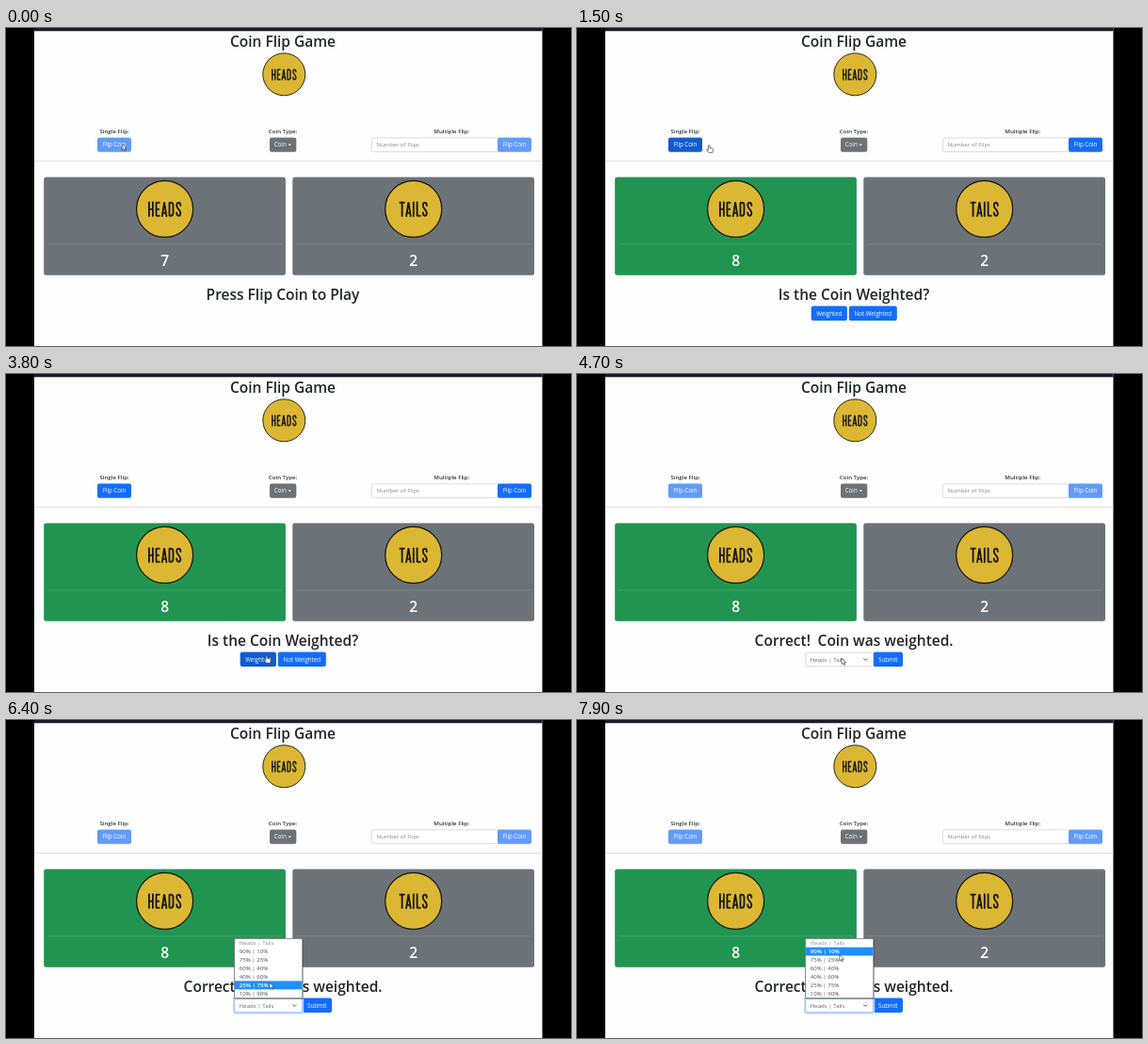
An HTML page that plays this animation: 600x338 px, repeating every 8 s.

```html
<!DOCTYPE html>
<html lang="en">
<head>
<meta charset="utf-8">
<title>Coin Flip Game</title>
<style>
  html, body { margin: 0; width: 100%; height: 100%; overflow: hidden; background: #000; }
  svg { display: block; width: 600px; height: 338px; }
  text { font-family: "Open Sans", "Noto Sans", sans-serif; font-size: 6.1px; fill: #63676b; }
  .mid { text-anchor: middle; }
  .h { font-size: 15.5px; font-weight: 600; fill: #212529; }
  .label { font-weight: 600; fill: #303439; }
  .btn text { font-size: 6.2px; font-weight: 500; fill: #fff; text-anchor: middle; }
  .count { font-size: 15.5px; font-weight: 600; fill: #fff; }
</style>
</head>
<body>
<svg id="stage" viewBox="0 0 600 338"></svg>
<script>
const NS = 'http://www.w3.org/2000/svg';
const stage = document.getElementById('stage');
const LOOP = 8000, STEP = 100;
const BLUE = '#126dfb', PALE = '#629bf9', DARK = '#105bd0', GREY = '#6b7278', GREEN = '#219452';

function add(parent, tag, attrs = {}, content) {
  const node = document.createElementNS(NS, tag);
  for (const key in attrs) node.setAttribute(key, attrs[key]);
  if (content !== undefined) node.textContent = content;
  parent.appendChild(node);
  return node;
}
const group = (parent = stage, attrs) => add(parent, 'g', attrs);
const rect = (parent, x, y, width, height, fill, more) =>
  add(parent, 'rect', { x, y, width, height, fill, ...more });
const label = (parent, x, y, content, cls = '') =>
  add(parent, 'text', { x, y, class: cls }, content);
const line = (x1, x2, y, stroke, parent = stage) =>
  add(parent, 'path', { d: `M${x1} ${y}H${x2}`, stroke, 'stroke-width': 0.8 });
const show = (node, on) => node.setAttribute('visibility', on ? 'visible' : 'hidden');
const paint = (node, fill) => node.setAttribute('fill', fill);

function button(parent, x, y, w, content, fill = BLUE, textX = x + w / 2) {
  const g = group(parent, { class: 'btn' });
  const box = rect(g, x, y, w, 15.3, fill, { rx: 2 });
  label(g, textX, y + 9.9, content);
  return box;
}

// Condensed coin lettering: [stroke path, advance]
const GLYPHS = {
  H: ['M1 0V16M5 0V16M1 8H5', 7.6],
  E: ['M5 1H1V15H5M1 8H4.5', 6.4],
  A: ['M.8 16L3.2 .5L5.6 16M1.6 12H4.8', 7.6],
  D: ['M1 1H2.6Q5 1 5 4V12Q5 15 2.6 15H1Z', 7.8],
  S: ['M5 5V4Q5 1 3 1T1 4Q1 6 3 8T5 12Q5 15 3 15T1 12V11', 6],
  T: ['M0 1H6M3 0V16', 6.6],
  I: ['M1 0V16', 3.8],
  L: ['M1 0V15H5', 6.2]
};
function coin(x, y, scale, word) {
  const g = group(stage, {
    transform: `translate(${x} ${y}) scale(${scale})`, role: 'img', 'aria-label': word
  });
  add(g, 'circle', { r: 30, fill: '#dbb733', stroke: '#15130c', 'stroke-width': 1.2 });
  const width = [...word].reduce((sum, c) => sum + GLYPHS[c][1], 0);
  let left = -width / 2;
  for (const c of word) {
    add(g, 'path', {
      d: GLYPHS[c][0], transform: `translate(${left} -7.8)`,
      fill: 'none', stroke: '#17150d', 'stroke-width': 1.8, 'stroke-linejoin': 'bevel'
    });
    left += GLYPHS[c][1];
  }
}

function card(x, word, count) {
  const box = rect(stage, x, 158.5, 256.7, 104.3, GREY, { rx: 2.5 });
  add(stage, 'path', {
    d: `M${x + 3.5} 229.8H${x + 253}`, stroke: '#fff', 'stroke-opacity': 0.16, 'stroke-width': 0.8
  });
  coin(x + 128.4, 192.4, 1, word);
  return { box, count: label(stage, x + 128.4, 252.7, count, 'mid count') };
}

// Page and controls
rect(stage, 30, 0, 539.5, 338, '#fefefe');
rect(stage, 30, 0, 539.5, 3.3, '#1c1925');
label(stage, 294, 19.6, 'Coin Flip Game', 'mid h');
coin(295.3, 49.3, 0.75, 'HEADS');
label(stage, 115, 111.5, 'Single Flip:', 'mid label');
label(stage, 294, 111.5, 'Coin Type:', 'mid label');
label(stage, 473.3, 111.5, 'Multiple Flip:', 'mid label');
const single = button(stage, 97, 116.4, 36, 'Flip Coin');
button(stage, 280, 116.4, 28.3, 'Coin', GREY, 291.2);
add(stage, 'path', { d: 'M299.6 123.4h3.4l-1.7 1.8z', fill: '#fff' });
rect(stage, 388.4, 116.8, 136, 14.6, '#fff', { rx: 2, stroke: '#c9ced3', 'stroke-width': 0.7 });
label(stage, 393.6, 126.3, 'Number of Flips').setAttribute('fill-opacity', 0.8);
const multi = button(stage, 522, 116.4, 36, 'Flip Coin');
line(30, 569.5, 141.5, '#d9dadb');
const heads = card(40.2, 'HEADS', '7');
card(304.3, 'TAILS', '2');

// The three stages of the lower part
const idle = group();
label(idle, 294, 288.8, 'Press Flip Coin to Play', 'mid h');

const ask = group();
label(ask, 294, 288.8, 'Is the Coin Weighted?', 'mid h');
const weighted = button(ask, 248.7, 295.6, 38.2, 'Weighted');
button(ask, 288.8, 295.6, 51, 'Not Weighted');

const answer = group();
label(answer, 188.6, 288.8, 'Correct!', 'h');
label(answer, 399.6, 288.8, 'Coin was weighted.', 'h').setAttribute('text-anchor', 'end');
button(answer, 314.6, 295.6, 31.4, 'Submit');
const glow = rect(answer, 241.8, 295, 73.6, 16.6, 'none',
  { rx: 2.4, stroke: '#bcd6fd', 'stroke-width': 1.6 });
const field = rect(answer, 242.8, 296, 71.8, 14.7, '#fff', { rx: 2, 'stroke-width': 0.8 });
label(answer, 247.8, 305.6, 'Heads | Tails');
add(answer, 'path', {
  d: 'M304.3 302.4l2 2l2-2', fill: 'none', stroke: '#42474c', 'stroke-width': 0.9
});

// Open list
const ROW = 8.95, TOP = 232.6;
const list = group();
rect(list, 243.6, 233.2, 72.4, 63.8, '#000', { 'fill-opacity': 0.25 });
rect(list, 242.6, 232.3, 72.2, 63.4, '#fff', { stroke: '#6f7275', 'stroke-width': 0.8 });
const mark = rect(list, 243, TOP, 71.4, ROW, '#c4c4c4');
const options = ['Heads | Tails', '90% | 10%', '75% | 25%', '60% | 40%',
  '40% | 60%', '25% | 75%', '10% | 90%'].map((name, i) =>
  label(list, 247.8, TOP + ROW * i + 6.8, name));

// Pointer
const arrow = add(stage, 'path', {
  d: 'M0 0V6.4L1.5 5.1L2.5 7.4L3.6 6.9L2.6 4.7H4.6Z',
  fill: '#fff', stroke: '#222', 'stroke-width': 0.6
});
const hand = add(stage, 'path', {
  d: 'M-.8 .7Q0-.5 .8 .7V3L3.9 3.6Q4.6 3.9 4.4 5L3.7 8H-.3L-2.5 5.2Q-2.4 4.2-1.5 4.6L-.8 5.2Z',
  fill: '#fff', stroke: '#222', 'stroke-width': 0.6
});

const PATH = [
  [0, 123.3, 123.3], [700, 121.8, 123.3], [1300, 122.2, 123.6], [1500, 140.2, 124.4],
  [2300, 212, 235], [3200, 276.5, 299], [4100, 277, 299.3], [5000, 282.4, 303],
  [5900, 282.4, 303], [6200, 280.5, 286], [6800, 278, 259.2], [7200, 278.4, 251], [7900, 278.8, 249.6]
];
function pointerAt(t) {
  const next = PATH.findIndex(p => p[0] > t);
  if (next < 0) return PATH[PATH.length - 1].slice(1);
  const a = PATH[next - 1], b = PATH[next];
  const k = (t - a[0]) / (b[0] - a[0]);
  const ease = k * k * (3 - 2 * k);
  return [a[1] + (b[1] - a[1]) * ease, a[2] + (b[2] - a[2]) * ease];
}

const LANDED = 800, GUESSED = 4600, OPENED = 5200;

function render(time) {
  const t = Math.floor(time / STEP) * STEP;
  const asking = t >= LANDED && t < GUESSED;
  const [x, y] = pointerAt(t);

  paint(multi, asking ? BLUE : PALE);
  paint(single, !asking ? PALE : t <= 1500 ? DARK : BLUE);
  paint(heads.box, t < LANDED ? GREY : GREEN);
  heads.count.textContent = t < LANDED ? '7' : '8';

  show(idle, t < LANDED);
  show(ask, asking);
  show(answer, t >= GUESSED);
  paint(weighted, t >= 3100 ? DARK : BLUE);

  const open = t >= OPENED;
  show(glow, open);
  field.setAttribute('stroke', open ? '#86b7fe' : '#c9ced3');
  show(list, open);
  const row = Math.floor((y - TOP) / ROW);
  const over = row > 0 && row < options.length ? row : 0;
  mark.setAttribute('y', TOP + ROW * over);
  paint(mark, over ? '#1e90ff' : '#c4c4c4');
  options.forEach((node, i) => {
    node.style.fill = i === over ? '#fff' : i ? '#4c5054' : '#8b8e91';
    node.style.fontWeight = i === over && i ? 600 : 400;
  });

  const pointing = asking && (t <= 1500 || t >= 3100);
  show(hand, pointing);
  show(arrow, !pointing);
  (pointing ? hand : arrow).setAttribute('transform', `translate(${x} ${y})`);
}

function tick() {
  render(performance.now() % LOOP);
  requestAnimationFrame(tick);
}
tick();
</script>
</body>
</html>
```
